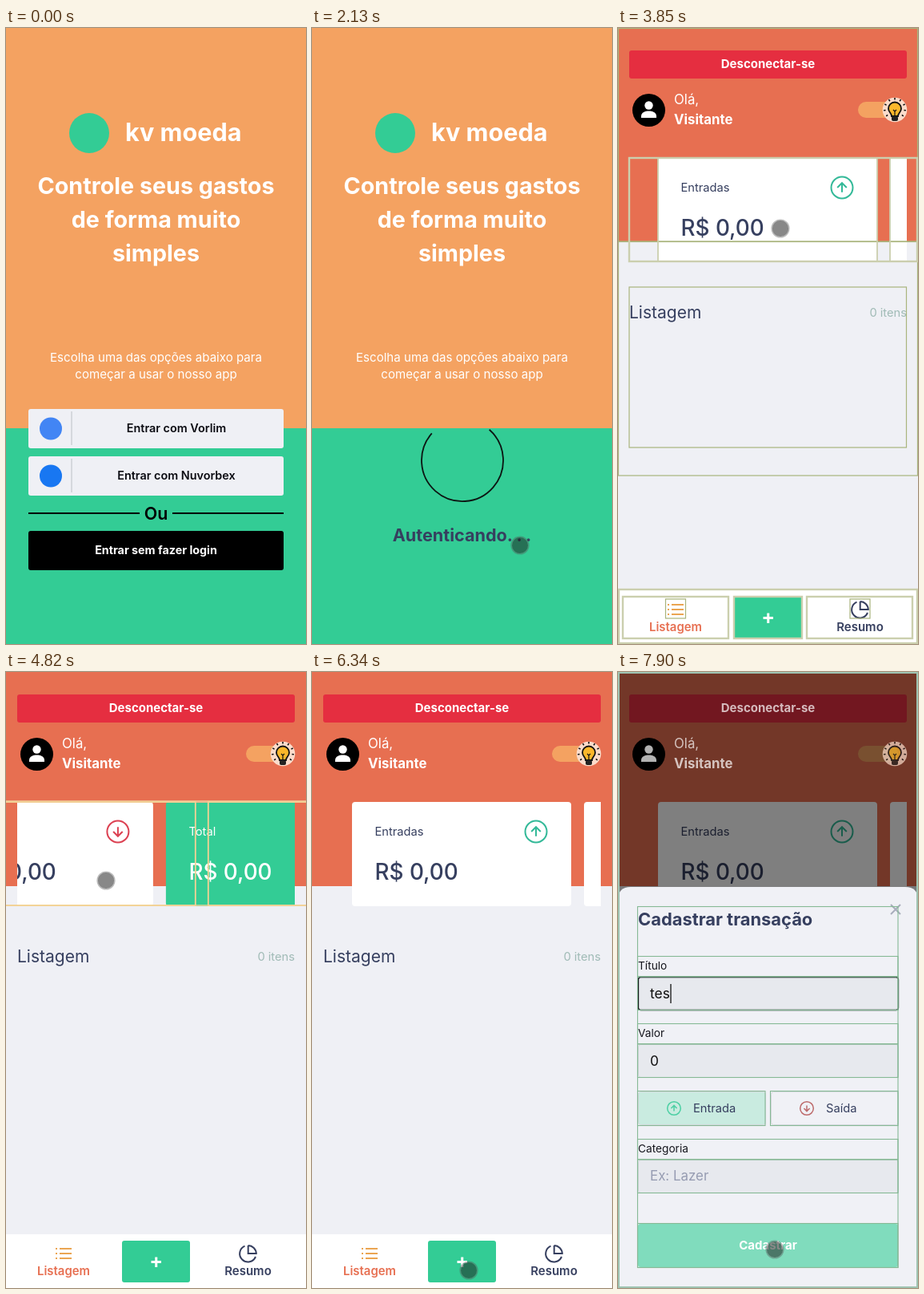
Write an HTML page that moves like this. It is 375x768 px and loops after 8 s.

```html
<!DOCTYPE html>
<html lang="pt-BR">
<head>
<meta charset="utf-8">
<title>Controle de gastos</title>
<style>
  html, body { margin: 0; width: 100%; height: 100%; overflow: hidden; background: #eff0f5; }
  svg { display: block; width: 375px; height: 768px; }
  text { font-family: Inter, "Open Sans", sans-serif; white-space: pre; }
</style>
</head>
<body>
<svg id="stage" viewBox="0 0 375 768" xmlns="http://www.w3.org/2000/svg"></svg>
<script>
const LOOP = 8000;
const C = {
  orange: '#f4a261', coral: '#e76f51', green: '#33cc95', red: '#e52e40', ink: '#363f5f',
  paper: '#eff0f5', muted: '#969cb2', field: '#e7e9ee', line: '#d5d8dd', label: '#15161d'
};

// Markup helpers
const rect = (x, y, w, h, fill, rx = 0, extra = '') =>
  `<rect x="${x}" y="${y}" width="${w}" height="${h}" fill="${fill}" rx="${rx}" ${extra}/>`;
const circle = (x, y, r, fill, extra = '') =>
  `<circle cx="${x}" cy="${y}" r="${r}" fill="${fill}" ${extra}/>`;
const stroke = (d, color, width = 2, extra = '') =>
  `<path d="${d}" fill="none" stroke="${color}" stroke-width="${width}" ${extra}/>`;
const text = (x, y, str, size, weight = 400, fill = C.ink, anchor = 'start', extra = '') =>
  `<text x="${x}" y="${y}" font-size="${size}" font-weight="${weight}" fill="${fill}" text-anchor="${anchor}" ${extra}>${str}</text>`;
const mid = (x, y, str, size, weight, fill) => text(x, y, str, size, weight, fill, 'middle');
const group = (id, body, extra = '') => `<g id="${id}" ${extra}>${body}</g>`;
const frame = (color, width, x, y, w, h) =>
  rect(x, y, w, h, 'none', 0, `stroke="${color}" stroke-width="${width}"`);
const repeat = (n, make) => Array.from({ length: n }, (_, i) => make(i)).join('');

const arrowIcon = (x, y, r, color, up) => {
  const s = r * .43, d = up ? -1 : 1, w = r > 10 ? 2 : 1.5;
  return circle(x, y, r, 'none', `stroke="${color}" stroke-width="${w}"`) +
    stroke(`M${x} ${y - d * s}V${y + d * s}M${x - s} ${y}L${x} ${y + d * s}L${x + s} ${y}`, color, w);
};

// Login screen
const loginButton = (y, label, mark) =>
  rect(28, y, 319, 49, C.paper, 3) + circle(56, y + 24.5, 14, mark) +
  rect(81, y + 3, 2, 42, C.line) + mid(213, y + 29, label, 14.4, 600, '#0b0b12');
const headline = ['Controle seus gastos', 'de forma muito', 'simples'];
const invite = ['Escolha uma das opções abaixo para', 'começar a usar o nosso app'];

const login = group('login',
  rect(0, 0, 375, 499, C.orange) + rect(0, 499, 375, 269, C.green) +
  circle(104, 131, 25, C.green) + text(149, 141, 'kv moeda', 30.6, 700, '#fff') +
  repeat(3, i => mid(187.5, 207 + 42 * i, headline[i], 28.7, 700, '#fff')) +
  repeat(2, i => mid(187.5, 416 + 21 * i, invite[i], 15.1, 400, '#fff')) +
  group('options',
    loginButton(475, 'Entrar com Vorlim', '#4285f4') +
    loginButton(534, 'Entrar com Nuvorbex', '#1877f2') +
    stroke('M28 605H167M208 605H347', '#000') + mid(187.5, 613, 'Ou', 21.4, 600, '#000') +
    rect(28, 627, 319, 49, '#000', 3) + mid(187.5, 656, 'Entrar sem fazer login', 14.3, 700, '#fff')) +
  group('auth',
    stroke('M224 503A51 51 0 1 1 152 503', '#0c1512', 1.8, 'id="spinner"') +
    mid(187.5, 640, 'Autenticando. . .', 21.6, 700, C.ink)));

// Dashboard
const PITCH = 290;
const cardX = i => 50 + PITCH * i;
const card = (i, label, value, fill, ink, icon = '') =>
  rect(cardX(i), 162, 274, 130, fill, 4) + text(cardX(i) + 28.5, 204, label, 14.7, 400, ink) +
  text(cardX(i) + 28.5, 259, value, 27.8, 500, ink) + icon;
const cardFrames = color => repeat(3, i => frame(color, 1.8, cardX(i), 162, 274, 129));

const ray = i => {
  const a = Math.PI * (.78 + i * .18), at = r => `${346 + r * Math.cos(a)} ${101 + r * Math.sin(a)}`;
  return `M${at(11.5)}L${at(14)}`;
};
const bulb = circle(346, 102, 15.3, '#fbdccb') + stroke(repeat(9, ray), '#111', 1.6) +
  `<path d="M342 110C342 106 338 105 338 100.5A8 8 0 0 1 354 100.5C354 105 350 106 350 110Z" fill="#fcb72b" stroke="#111" stroke-width="1.8"/>` +
  stroke('M344 102L346 104L348 102M346 104V109', '#111', 1.2) + rect(342, 110, 8, 6, '#222', 2);

const headerLabels = group('headerLabels',
  mid(187.5, 50, 'Desconectar-se', 15, 700, '#fff') +
  circle(38.5, 96.5, 5.2, '#fff') + `<path d="M29 112V110C29 105 34 103.5 38.5 103.5S48 105 48 110V112Z" fill="#fff"/>` +
  text(70, 95, 'Olá,', 16.8, 400, '#fff') + text(70, 120, 'Visitante', 16.8, 700, '#fff') + bulb);

const OLIVE = '#a9b47c', PALE = '#cbcfae';
const tabs = repeat(3, i => frame(PALE, 2.4, 6 + i * 139 - (i > 1 ? 48 : 0), 709, i === 1 ? 85 : 132, 52));
const dashboard = group('dashboard',
  rect(0, 0, 375, 768, C.paper) + rect(0, 0, 375, 267, C.coral) +
  rect(14, 28, 347, 35, C.red, 3) + circle(38.5, 102.5, 20.5, '#000') + rect(300, 92, 50, 20, C.orange, 10) +
  `<g clip-path="url(#track)">` + group('cards',
    card(0, 'Entradas', 'R$ 0,00', '#fff', C.ink, arrowIcon(cardX(0) + 230, 199, 13.5, '#33b998', true)) +
    card(1, 'Saídas', '- R$ 0,00', '#fff', C.ink, arrowIcon(cardX(1) + 230, 199, 13.5, '#dc4152', false)) +
    card(2, 'Total', 'R$ 0,00', C.green, '#fff')) + `</g>` +
  text(14, 362, 'Listagem', 21) + text(361, 360, '0 itens', 14.7, 400, '#a0bbb6', 'end') +
  rect(0, 701, 375, 67, '#fff') +
  stroke(repeat(3, i => `M62 ${719 + 6 * i}h2m3 0h15`), '#eba552') +
  mid(72, 752, 'Listagem', 14.9, 600, C.coral) +
  rect(145, 709, 85, 52, C.green, 3) + stroke('M181.5 735.5H194M187.75 729.5V742', '#fff', 3) +
  stroke('M312 729A10.3 10.3 0 1 1 298.5 715.6M302.7 715V725H312.8A10.3 10.3 0 0 0 302.7 715', C.ink) +
  mid(302.5, 752, 'Resumo', 15, 600, C.ink) +
  group('pageBoxes',
    frame(OLIVE, 1.2, .5, .5, 374, 266) + frame(OLIVE, 1.2, .5, 266, 374, 292) + frame(OLIVE, 1.2, 14, 323, 346.5, 200) +
    frame(OLIVE, 1.2, 59.5, 712, 25, 24) + frame(OLIVE, 1.2, 290, 712, 25, 24) +
    frame(PALE, 2.4, 14, 162, 360, 129) + cardFrames(PALE) + frame(PALE, 2.4, 1, 700, 373, 67) + tabs) +
  group('cardBoxes',
    stroke('M0 161.5H375', '#edb78d', 3) + stroke('M0 291H375', '#efd49a', 1.6) +
    group('cardEdges', cardFrames('#f3d295'))));

// Modal, laid out relative to its own top edge
const MINT = '#86b995', FIELD_TOPS = [86, 170, 314];
const thin = `stroke="${C.line}"`;
const field = (i, label, extra = thin) =>
  text(25, FIELD_TOPS[i] + 17, label, 13.7, 400, C.label) +
  rect(25.5, FIELD_TOPS[i] + 26.5, 325, 41, C.field, 3, extra);
const choice = (x, label, fill, color, up) =>
  rect(x, 255.5, 159, 41, fill, 3, thin) + arrowIcon(x + 44.5, 276, 8.3, color, up) + text(x + 68.5, 281, label, 14.7);

const modal = group('modal',
  `<path d="M0 520V16Q0 0 16 0H359Q375 0 375 16V520Z" fill="#f0f1f6"/>` +
  text(25, 48, 'Cadastrar transação', 21.9, 700) + stroke('M341 22L353 34M353 22L341 34', '#a9adbd') +
  field(0, 'Título', 'id="titleField" stroke="#0b0c12"') + field(1, 'Valor') + field(2, 'Categoria') +
  text(40, 139, 'Ex: Video game', 17.6, 400, C.muted, 'start', 'id="hint"') +
  text(40, 139, '', 17.4, 400, '#111', 'start', 'id="typed"') + rect(40, 121, 1.3, 24, '#111', 0, 'id="caret"') +
  text(40, 223, '0', 17.4, 400, '#111') + text(40, 366, 'Ex: Lazer', 16.9, 400, C.muted) +
  choice(25.5, 'Entrada', '#c9ebe0', '#4ccfa3', true) + choice(191.5, 'Saída', '#f0f1f6', '#bd6b6c', false) +
  rect(25, 420, 325, 54, '#80dcbd', 3) + mid(187.5, 452, 'Cadastrar', 15, 700, '#fff') +
  group('formBoxes',
    frame(MINT, 1.1, 24.5, 24.5, 325.5, 450) + frame(MINT, 1.1, 24.5, 419.5, 325.5, 55) +
    repeat(3, i => frame(MINT, 1.1, 24.5, FIELD_TOPS[i] + .5, 325.5, 25) + frame(MINT, 1.1, 24.5, FIELD_TOPS[i] + 26, 325.5, 41.5)) +
    repeat(2, i => frame(MINT, 1.1, 24.5 + 166 * i, 254.5, 159.5, 43))));

document.getElementById('stage').innerHTML =
  `<clipPath id="track"><rect x="14" y="160" width="347" height="134"/></clipPath>` +
  login + dashboard + rect(0, 0, 375, 768, '#000', 0, 'id="shade"') + headerLabels + modal +
  group('screenBox', frame('#9fc4b2', 2, 1, 1, 373, 766)) +
  group('touch', circle(0, 0, 10, '#1b1b1b', 'fill-opacity=".52"') +
    circle(0, 0, 10.6, 'none', 'stroke="#555" stroke-opacity=".4" stroke-width="2"'));

// Motion
const $ = Object.fromEntries([...document.querySelectorAll('[id]')].map(e => [e.id, e]));
const set = (el, name, value) => el.setAttribute(name, value);
const show = (el, on) => set(el, 'visibility', on ? 'visible' : 'hidden');
const ramp = (t, a, b) => Math.min(1, Math.max(0, (t - a) / (b - a)));
const easeOut = p => 1 - (1 - p) ** 2;
const smooth = (t, a, b) => { const p = ramp(t, a, b); return p * p * (3 - 2 * p); };

// Two swipes forward, two back
const scroll = t => -PITCH *
  (smooth(t, 4060, 4330) + smooth(t, 4430, 5230) - smooth(t, 5300, 5490) - smooth(t, 5740, 6000));

const glides = [
  { from: 120, to: 520, x: 260, y: 645 },
  { from: 3220, to: 3800, x: 203, y: 250 },
  { from: 4060, to: 4820, x: 125, y: 260 },
  { from: 4880, to: 5480, x: 151, y: 257 },
  { from: 5740, to: 6340, x: 196, y: 746 },
  { from: 7300, to: 7480, x: 196, y: 720 }
];
const touchAt = t => glides.reduce((pos, g) => {
  const p = smooth(t, g.from, g.to);
  return { x: pos.x + (g.x - pos.x) * p, y: pos.y + (g.y - pos.y) * p };
}, { x: 330, y: 792 });

function draw(t) {
  const home = t >= 2460;
  show($.login, !home);
  show($.dashboard, home);
  show($.headerLabels, home);
  set($.options, 'opacity', 1 - ramp(t, 850, 1200));
  set($.auth, 'opacity', ramp(t, 1100, 1500));
  set($.spinner, 'transform', `rotate(${(t - 2130) * .36 - 4} 188 539)`);

  set($.cards, 'transform', `translate(${scroll(t)} 0)`);
  set($.cardEdges, 'transform', `translate(${scroll(t - 100)} 0)`);
  set($.pageBoxes, 'opacity', 1 - ramp(t, 3970, 4150));
  set($.cardBoxes, 'opacity', ramp(t, 4060, 4120) * (1 - ramp(t, 5900, 6100)));

  const dim = ramp(t, 6620, 6880);
  set($.shade, 'opacity', .5 * dim);
  set($.headerLabels, 'opacity', 1 - .3 * dim);
  set($.modal, 'transform', `translate(0 ${768 - 500 * easeOut(ramp(t, 6816, 7296))})`);
  show($.screenBox, t >= 6620);
  show($.formBoxes, t >= 7360);

  const typed = 'tes'.slice(0, Math.max(0, Math.floor((t - 7360) / 270) + 1));
  $.typed.textContent = typed;
  show($.hint, !typed);
  set($.titleField, 'stroke-width', typed ? 1.3 : 2);
  set($.caret, 'x', typed ? 40.5 + $.typed.getComputedTextLength() : 40);

  const { x, y } = touchAt(t);
  set($.touch, 'transform', `translate(${x} ${y})`);
}

const start = performance.now();
function tick() {
  draw((performance.now() - start) % LOOP);
  requestAnimationFrame(tick);
}
tick();
</script>
</body>
</html>
```
